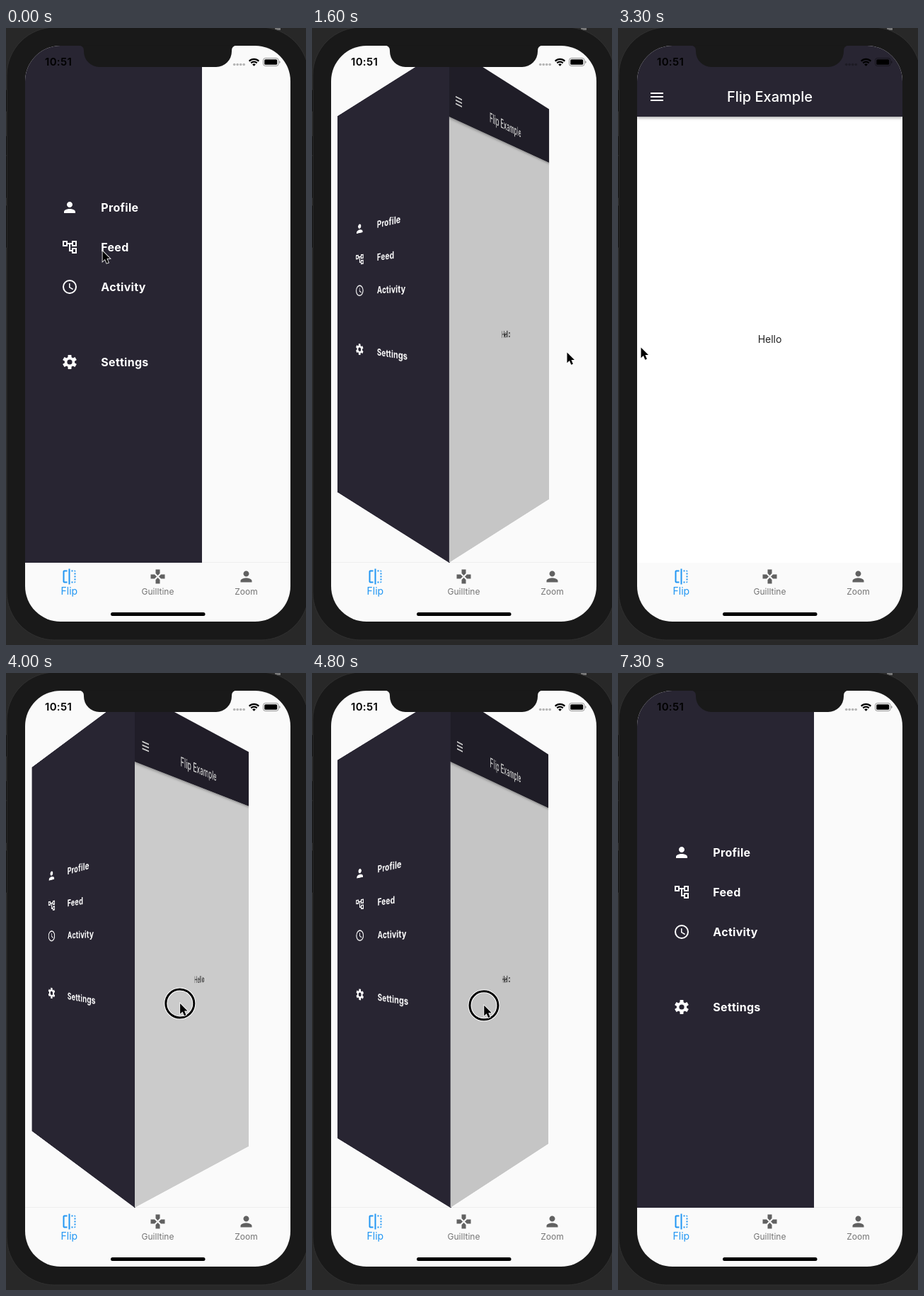
Animation, 424 px wide and 870 px high, one loop 7800 ms. Source, as an HTML page:

```html
<!DOCTYPE html>
<html lang="en">
<head>
<meta charset="utf-8">
<title>Flip drawer</title>
<style>
  html, body { margin: 0; width: 100%; height: 100%; overflow: hidden; background: #282828; }
  #stage { position: relative; width: 424px; height: 870px; overflow: hidden; }
  #stage > svg { position: absolute; left: 0; top: 0; }
  svg { display: block; font-family: Inter, "Liberation Sans", sans-serif; }
  #screen { position: absolute; left: 27px; top: 25px; width: 375px; height: 812px;
    border-radius: 50px; overflow: hidden; background: #fafafa; }
  #divider { position: absolute; top: 727.5px; width: 100%; height: 1px; background: #eee; }
  #drawer, #page, #hinge { position: absolute; left: 0; top: 0; height: 728.5px; }
  #drawer, #page { outline: 1px solid transparent; }
  #drawer { width: 250px; background: #282532; transform-origin: 100% 50%; }
  #page { width: 375px; background: #fff; transform-origin: 0 50%; clip-path: inset(0 -8px 0 0); }
  #hinge { width: 2px; background: #282532; }
  #bar { position: absolute; width: 375px; height: 100px; background: #282532;
    box-shadow: 0 2px 4px rgba(0, 0, 0, .32); }
  #page svg { position: absolute; left: 0; top: 0; }
  #shade { position: absolute; inset: 0; background: #000; }
</style>
</head>
<body>
<div id="stage">
  <svg width="424" height="870">
    <rect x="380" width="8" height="3" fill="#777"/>
    <rect x="1" y="-1" width="427" height="864" rx="68" fill="#191919" stroke="#303030"/>
    <g fill="#101010" stroke="#343434" stroke-width=".6">
      <rect x="-1" y="87" width="2.5" height="31"/>
      <rect x="-1" y="152" width="2.5" height="28"/>
      <rect x="-1" y="180" width="2.5" height="60"/>
      <rect x="-1" y="250" width="2.5" height="60"/>
    </g>
  </svg>

  <div id="screen">
    <div id="divider"></div>
    <div id="hinge"></div>
    <div id="drawer">
      <svg width="250" height="728.5" viewBox="27 25 250 728.5" fill="#fff" font-size="16" font-weight="700" letter-spacing=".3">
        <defs>
          <path id="person" d="M12 12c2.21 0 4-1.79 4-4s-1.79-4-4-4-4 1.79-4 4 1.79 4 4 4zm0 2c-2.67 0-8 1.34-8 4v2h16v-2c0-2.66-5.33-4-8-4z"/>
        </defs>
        <use href="#person" x="78" y="241"/>
        <path transform="translate(78 297)" d="M22 11V3h-7v3H9V3H2v8h7V8h2v10h4v3h7v-8h-7v3h-2V8h2v3h7zM7 9H4V5h3v4zm10 6h3v4h-3v-4zm0-10h3v4h-3V5z"/>
        <g transform="translate(90 365)" fill="none" stroke="#fff">
          <circle r="9" stroke-width="2"/>
          <path d="M-.25-5V.6L4.6 3.5" stroke-width="1.5"/>
        </g>
        <g id="gear" transform="translate(90 471)">
          <circle r="7.2"/>
        </g>
        <text x="134.3" y="259">Profile</text>
        <text x="134.3" y="315">Feed</text>
        <text x="134.3" y="371">Activity</text>
        <text x="134.3" y="477">Settings</text>
      </svg>
    </div>
    <div id="page">
      <div id="bar"></div>
      <svg width="375" height="728.5" viewBox="27 25 375 728.5" text-anchor="middle">
        <path d="M46 92h18M46 97h18M46 102h18" stroke="#fff" stroke-width="2"/>
        <text x="214.5" y="104" font-size="20" font-weight="500" fill="#fff">Flip Example</text>
        <text x="214.5" y="444" font-size="14" fill="#212121">Hello</text>
      </svg>
      <div id="shade"></div>
    </div>
  </div>

  <svg width="424" height="870" text-anchor="middle">
    <path d="M103 24.5Q110 25 110 32V33A22 22 0 0 0 132 55H297A22 22 0 0 0 319 33V32Q319 25 326 24.5Z" fill="#191919"/>
    <text x="55" y="53.3" font-size="15" font-weight="600" letter-spacing=".3" text-anchor="start">10:51</text>
    <g opacity=".27">
      <circle cx="322.7" cy="51.5" r="1.8"/><circle cx="327.2" cy="51.5" r="1.8"/>
      <circle cx="331.7" cy="51.5" r="1.8"/><circle cx="336.2" cy="51.5" r="1.8"/>
    </g>
    <g transform="translate(350.5 53.3)" fill="none" stroke="#000" stroke-width="2.3">
      <path d="M-6.8-6.6A9.5 9.5 0 0 1 6.8-6.6M-4.2-3.9A5.8 5.8 0 0 1 4.2-3.9"/>
      <path d="M0 .4L-2.3-1.8A3.2 3.2 0 0 1 2.3-1.8Z" fill="#000" stroke="none"/>
    </g>
    <rect x="363.5" y="42.5" width="21.5" height="11" rx="3" fill="none" stroke="#000" stroke-opacity=".4"/>
    <path d="M386.2 46v4q1.4-.6 1.4-2t-1.4-2z" opacity=".45"/>
    <rect x="365.2" y="44.2" width="18" height="7.6" rx="1.6"/>

    <g fill="#2196f3">
      <path transform="translate(77.5 761.5)" d="M15 21h2v-2h-2v2zm4-12h2V7h-2v2zM3 5v14c0 1.1.9 2 2 2h4v-2H5V5h4V3H5c-1.1 0-2 .9-2 2zm16-2v2h2c0-1.1-.9-2-2-2zm-8 20h2V1h-2v22zm8-6h2v-2h-2v2zM15 5h2V3h-2v2zm4 8h2v-2h-2v2zm0 8c1.1 0 2-.9 2-2h-2v2z"/>
      <text x="89.3" y="799" font-size="14">Flip</text>
    </g>
    <g fill="#616161">
      <path transform="translate(202.5 761.5)" d="M15 7.5V2H9v5.5l3 3 3-3zM7.5 9H2v6h5.5l3-3-3-3zM9 16.5V22h6v-5.5l-3-3-3 3zM16.5 9l-3 3 3 3H22V9h-5.5z"/>
      <use href="#person" x="327.5" y="761.5"/>
    </g>
    <g fill="#757575" font-size="12">
      <text x="214.5" y="799">Guilltine</text>
      <text x="339.5" y="799">Zoom</text>
    </g>
    <rect x="148" y="824" width="133.5" height="5" rx="2.5"/>

    <g id="pointer">
      <g id="ring" fill="none">
        <circle cx=".2" cy=".5" r="20" stroke="#fff" stroke-width="5"/>
        <circle cx=".2" cy=".5" r="20" stroke="#000" stroke-width="3"/>
      </g>
      <path d="M.5.5V15.2L3.9 12 6.3 17.8 8.9 16.7 6.5 11H11Z" stroke="#fff" stroke-width="1.6" paint-order="stroke"/>
    </g>
  </svg>
</div>

<script>
const LOOP = 7800, STEP = 100;
const SLIDE = 250;
const TAP = 1467, CLOSE_TIME = 400;
const PRESS = 3600, RELEASE = 5700;
const DRAG_ORIGIN = 55, DRAG_LAG = 75;

const el = id => document.getElementById(id);
const clamp = v => Math.min(1, Math.max(0, v));
const ease = p => p * p * (3 - 2 * p);

// Each glide runs from the end of the one before it.
const home = { x: 136, y: 314 };
const glides = [
  { from: 0, to: 300, x: 175, y: 447 },
  { from: 400, to: 1100, x: 360, y: 457, sag: 38 },
  { from: 2100, to: 2900, x: 51, y: 446, sag: 8 },
  { from: 2900, to: 3300, x: 32, y: 450 },
  { from: 3550, to: 4100, x: 266, y: 467 },
  { from: 4100, to: 4500, x: 200, y: 465.5 },
  { from: 4550, to: 5100, x: 299, y: 472 },
  { from: 5500, to: 5525, x: 303, y: 472 },
  { from: 5600, to: 5800, x: 398, y: 476 },
  { from: 5900, to: 6300, x: 370, y: 477 },
  { from: 6500, to: 7000, x: 131, y: 107 },
  { from: 7100, to: 7200, x: 81, y: 60 }
];

function pointerAt(t) {
  const i = glides.findLastIndex(g => g.from <= t);
  const g = glides[i], a = glides[i - 1] || home;
  const p = ease(clamp((t - g.from) / (g.to - g.from)));
  return {
    x: a.x + (g.x - a.x) * p,
    y: a.y + (g.y - a.y) * p + (g.sag || 0) * Math.sin(Math.PI * p)
  };
}

// 1 shows the drawer, 0 shows the page.
function opennessAt(t) {
  if (t < PRESS) return clamp(1 - (t - TAP) / CLOSE_TIME);
  if (t < RELEASE) return clamp((pointerAt(t - DRAG_LAG).x - DRAG_ORIGIN) / SLIDE);
  return 1;
}

function buildGear() {
  const teeth = [0, 60, 120].map(a =>
    `<rect x="-2.5" y="-10" width="5" height="20" rx=".7" transform="rotate(${a})"/>`).join("");
  el("gear").innerHTML += teeth + '<circle r="3.6" fill="#282532"/>';
}

function show(id, visible) {
  el(id).style.visibility = visible ? "visible" : "hidden";
}

function render(t) {
  const open = opennessAt(t);
  const { x, y } = pointerAt(t);

  show("drawer", open > 0);
  show("page", open < 1);
  show("hinge", open > 0 && open < 1);
  el("drawer").style.transform =
    `translateX(${SLIDE * (open - 1)}px) perspective(333.33px) rotateY(${-90 * (1 - open)}deg)`;
  el("page").style.transform =
    `translateX(${SLIDE * open}px) perspective(1000px) rotateY(${90 * open}deg)`;
  el("hinge").style.left = `${SLIDE * open - 1}px`;
  el("shade").style.opacity = .3 * Math.sin(open * Math.PI / 2) ** 2;

  el("pointer").setAttribute("transform", `translate(${x} ${y})`);
  show("pointer", t < 7300);
  show("ring", t >= PRESS && t < RELEASE);
}

buildGear();
const start = performance.now();
function tick() {
  const t = (performance.now() - start) % LOOP;
  render(Math.floor(t / STEP) * STEP);
  requestAnimationFrame(tick);
}
tick();
</script>
</body>
</html>
```
